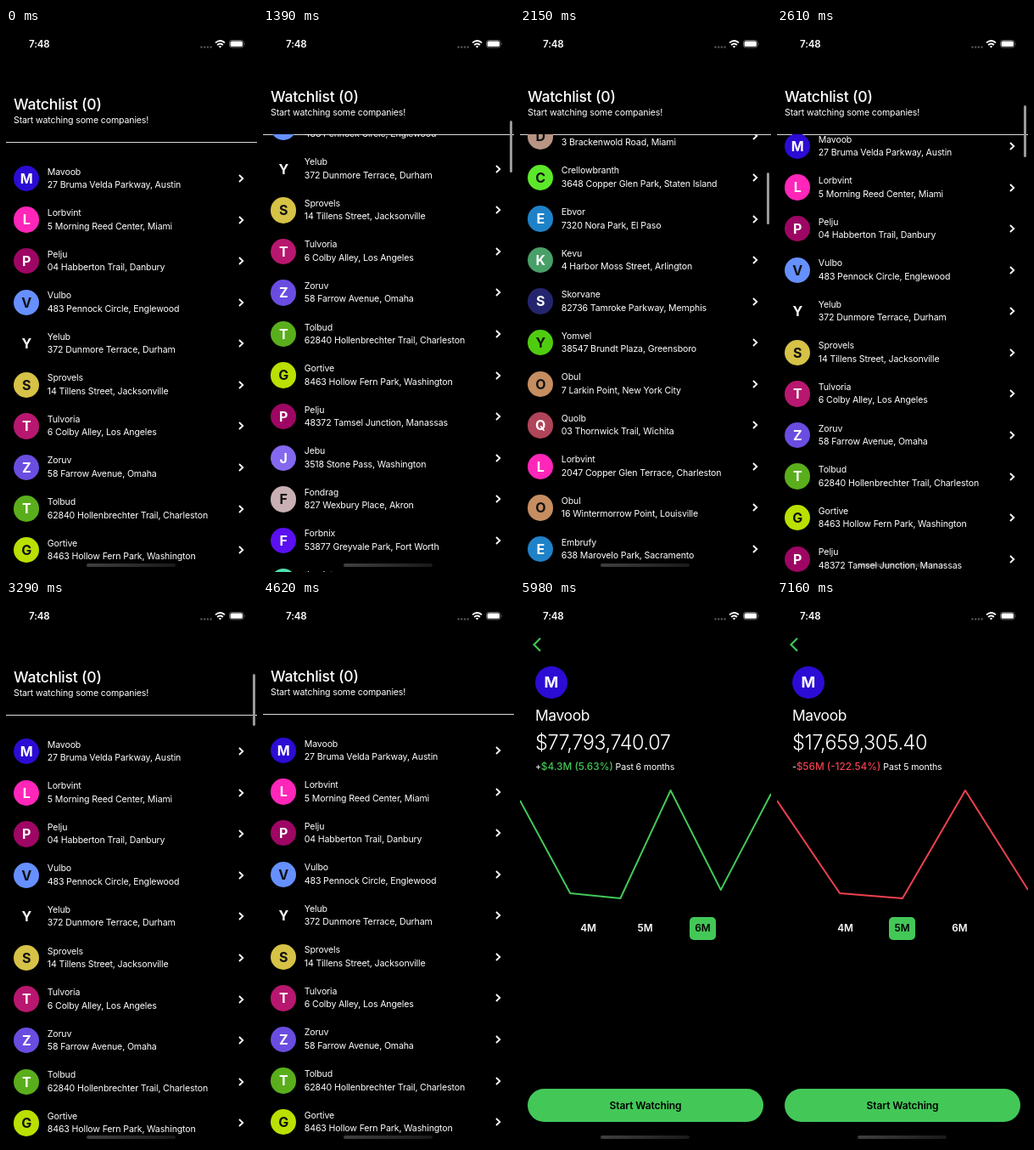
These frames come from a looping animation (296x640 px, 8000 ms). An HTML page:

```html
<!DOCTYPE html>
<html lang="en">
<head>
<meta charset="utf-8">
<title>Company watchlist</title>
<style>
  html, body { margin: 0; width: 100%; height: 100%; overflow: hidden; background: #000; }
  #stage {
    position: relative; width: 296px; height: 640px; overflow: hidden; background: #000; color: #fff;
    font: 400 10.6px/20px Inter, "Liberation Sans", sans-serif; letter-spacing: -.15px; white-space: nowrap;
  }
  #stage div, #stage svg { position: absolute; }
  .screen { left: 0; top: 0; width: 296px; height: 640px; background: #000; overflow: hidden; }
  .big { font-size: 17.4px; letter-spacing: -.35px; }
  #head { left: 0; top: 0; width: 296px; height: 134px; border-bottom: 1px solid #dcdcdc; }
  #title { left: 9px; top: 79.5px; font-size: 17.6px; font-weight: 500; letter-spacing: -.22px; }
  #list { left: 0; width: 296px; bottom: 0; overflow: hidden; }
  #rows { left: 0; top: 0; width: 296px; }
  .row { left: 0; width: 296px; height: 30.4px; }
  .badge { left: 9.1px; top: 0; width: 30.4px; border-radius: 50%; text-align: center; font: 700 16px/30.4px Inter, sans-serif; letter-spacing: 0; }
  .row .name { left: 48.8px; top: -2.3px; }
  .row .addr { left: 48.8px; top: 13.2px; }
  .row svg { left: 271.7px; top: 9.2px; }
  #thumb { left: 291px; width: 3px; height: 61px; border-radius: 2px; background: #999; }
  #price { left: 18px; top: 153px; font-size: 23.5px; font-weight: 300; line-height: 30px; letter-spacing: -.45px; }
  #delta { left: 18px; top: 186px; }
  #delta b { font-size: 11.8px; font-weight: 500; letter-spacing: 0; }
  .chip { top: 373px; width: 31px; height: 27px; border-radius: 5px; text-align: center; font: 600 11.8px/27px Inter, sans-serif; letter-spacing: 0; }
  .chip.on { background: #43c858; color: #000; }
  #watch { left: 9px; top: 575px; width: 278px; border-radius: 20px; background: #43c858; color: #000; text-align: center; font: 600 12px/39px Inter, sans-serif; letter-spacing: -.08px; }
  #home { left: 95px; top: 630px; width: 105px; height: 4px; border-radius: 2px; background: linear-gradient(90deg, rgba(255,255,255,.25), rgba(255,255,255,.1)); }
  #clock { left: 27px; top: 9px; font-size: 11.6px; font-weight: 600; letter-spacing: -.15px; }
</style>
</head>
<body>
<div id="stage">
  <div class="screen" id="main">
    <div id="head">
      <div id="title">Watchlist (0)</div>
      <div style="left:9px;top:99px">Start watching some companies!</div>
    </div>
    <div id="list"><div id="rows"></div></div>
    <div id="thumb"></div>
  </div>

  <div class="screen" id="detail">
    <div class="badge" style="left:18px;top:78px;width:38px;font-size:18px;line-height:38px;background:#2b0cd4">M</div>
    <div class="big" style="left:18px;top:126px">Mavoob</div>
    <div id="price"></div>
    <div id="delta"><span id="sign"></span><b id="change"></b> <span id="span"></span></div>
    <svg id="chart" width="296" height="400" style="left:0;top:0" fill="none" stroke-width="2" stroke-linejoin="round">
      <polyline id="line"/>
    </svg>
    <div class="chip" style="left:65px">4M</div>
    <div class="chip" id="five" style="left:132px">5M</div>
    <div class="chip" id="six" style="left:200px">6M</div>
    <div id="watch">Start Watching</div>
  </div>

  <svg id="back" width="40" height="70" style="left:0;top:0" fill="none" stroke="#3fc656" stroke-width="2.2">
    <path d="M24 45L16.5 52.5L24 60"/>
  </svg>
  <div id="clock">7:48</div>
  <svg width="296" height="40" style="left:0;top:0">
    <g fill="#555">
      <circle cx="230.5" cy="22.5" r="1.2"/><circle cx="234.2" cy="22.5" r="1.2"/>
      <circle cx="237.9" cy="22.5" r="1.2"/><circle cx="241.6" cy="22.5" r="1.2"/>
    </g>
    <g fill="none" stroke="#fff" stroke-width="1.8">
      <path d="M247 17.4Q252.5 12.6 258 17.4"/><path d="M249.1 20Q252.5 17 255.9 20"/>
    </g>
    <path d="M250.7 21.6Q252.5 20.2 254.3 21.6L252.5 23.4Z" fill="#fff"/>
    <rect x="263.5" y="14.5" width="16.5" height="8.4" rx="2.6" fill="none" stroke="#666"/>
    <rect x="264.6" y="15.6" width="14.3" height="6.2" rx="1.6" fill="#fff"/>
    <path d="M281 17.2q1.4 1.5 0 3z" fill="#666"/>
  </svg>
  <div id="home"></div>
</div>

<script>
const $ = id => document.getElementById(id);
const LOOP = 8000, PITCH = 48.57, FIRST = 177;

// name, address, badge colour; a leading "*" means dark lettering
const companies = `Mavoob|27 Bruma Velda Parkway, Austin|#2b0cd4
Lorbvint|5 Morning Reed Center, Miami|#ff26b9
Pelju|04 Habberton Trail, Danbury|#9e0664
*Vulbo|483 Pennock Circle, Englewood|#6690ff
Yelub|372 Dunmore Terrace, Durham|#000
*Sprovels|14 Tillens Street, Jacksonville|#d6c246
Tulvoria|6 Colby Alley, Los Angeles|#b8176f
Zoruv|58 Farrow Avenue, Omaha|#6a4de0
Tolbud|62840 Hollenbrechter Trail, Charleston|#5aae1c
*Gortive|8463 Hollow Fern Park, Washington|#b9e000
Pelju|48372 Tamsel Junction, Manassas|#9e0664
Jebu|3518 Stone Pass, Washington|#8468f0
*Fondrag|827 Wexbury Place, Akron|#c9b0b4
Forbnix|53877 Greyvale Park, Fort Worth|#5a10f0
*Jorvint|215 Linden Hollow Court, Tampa|#4de0b0
*Dabtrel|3 Brackenwold Road, Miami|#b89484
*Crellowbranth|3648 Copper Glen Park, Staten Island|#5ce82a
Ebvor|7320 Nora Park, El Paso|#1f82c8
Kevu|4 Harbor Moss Street, Arlington|#48a068
Skorvane|82736 Tamroke Parkway, Memphis|#25256f
*Yomvel|38547 Brundt Plaza, Greensboro|#50cc10
*Obul|7 Larkin Point, New York City|#c58d60
Quolb|03 Thornwick Trail, Wichita|#b04458
Lorbvint|2047 Copper Glen Terrace, Charleston|#ff26b9
*Obul|16 Wintermorrow Point, Louisville|#c58d60
Embrufy|638 Marovelo Park, Sacramento|#1f82c8
Tulvoria|92 Alder Brook Lane, Dayton|#b8176f`.split("\n");

$("rows").innerHTML = companies.map((entry, i) => {
  const dark = entry[0] === "*";
  const [name, addr, color] = entry.replace("*", "").split("|");
  return `<div class="row" style="top:${i * PITCH}px">
    <div class="badge" style="background:${color};color:${dark ? "#111" : "#fff"}">${name[0]}</div>
    <div class="name">${name}</div><div class="addr">${addr}</div>
    <svg width="10" height="12" fill="none" stroke="#fff" stroke-width="1.8"><path d="M3 2L7.3 6L3 10"/></svg></div>`;
}).join("");

// moments at which the screen refreshes
const ticks = [0, 1250, 1390, 1500, 1610, 1720, 1820, 1930, 2040, 2150, 2260, 2370, 2500, 2610, 2720,
  2830, 2940, 3050, 3170, 3290, 4370, 4510, 4620, 5380, 5510, 5640, 5750, 5860, 5980, 7160];
const snap = t => ticks.filter(k => k <= t).pop();
const clamp = (v, a, b) => Math.min(b, Math.max(a, v));

function scrollAt(t) {
  if (t < 1160 || t >= 4370) return 0;
  if (t < 1390) return 205.5 * ((t - 1160) / 230) ** 1.6;
  if (t < 2200) return 205.5 + 733 * (1 - Math.exp((1390 - t) / 500));
  if (t < 2610) {
    const p = clamp((t - 2190) / 420, 0, 1);
    return 778 - 740 * p * p * (3 - 2 * p);
  }
  const u = t - 2610;                     // rubber band at the top
  return (38 - .9 * u) * Math.exp(-u / 110);
}

function thumbAlpha(t) {
  if (t < 1250 || t >= 4620) return 0;
  return t < 4370 ? 1 : clamp((4620 - t) / 400, 0, 1);
}

const levels = [236, 345, 351, 224, 341, 228];

function drawChart(count, color, scale, reveal) {
  const step = 296 / (count - 1), floor = 372;
  $("line").setAttribute("points", levels.slice(0, count)
    .map((y, i) => `${i * step},${floor + (y - floor) * scale}`).join(" "));
  $("line").setAttribute("stroke", color);
  $("chart").style.clipPath = `inset(0 ${296 * (1 - reveal)}px 0 0)`;
}

function showPeriod(months, price, sign, change, color) {
  $("price").textContent = price;
  $("sign").textContent = sign;
  $("change").textContent = change;
  $("change").style.color = color;
  $("span").textContent = `Past ${months} months`;
  $("five").classList.toggle("on", months === 5);
  $("six").classList.toggle("on", months === 6);
}

function render(time) {
  const t = snap(time);
  const scroll = scrollAt(t);
  const shift = Math.round(Math.max(-9, -scroll));
  const top = 134 + shift;
  $("head").style.top = shift + "px";
  $("list").style.top = top + "px";
  $("rows").style.top = FIRST - 15.2 - scroll - top + "px";
  $("thumb").style.top = 87 + Math.max(0, scroll) * .107 + "px";
  $("thumb").style.opacity = thumbAlpha(t);

  const u = Math.max(0, (t - 5320) / 78);
  const rest = t >= 5980 ? 0 : (1 + u) * Math.exp(-u);
  $("detail").style.left = Math.round(296 * rest) + "px";
  $("main").style.left = Math.round(-88.8 * (1 - rest)) + "px";
  $("back").style.opacity = (1 - rest) ** 1.2;

  if (t >= 7160) {
    showPeriod(5, "$17,659,305.40", "-", "$56M (-122.54%)", "#f0414f");
    drawChart(5, "#f0414f", 1, 1);
  } else {
    const q = clamp((t - 5380) / 600, 0, 1);
    showPeriod(6, "$77,793,740.07", "+", "$4.3M (5.63%)", "#43c858");
    drawChart(6, "#43c858", 1 - (1 - q) ** 1.4, q ** 1.08);
  }
}

function frame() {
  render(performance.now() % LOOP);
  requestAnimationFrame(frame);
}
frame();
</script>
</body>
</html>
```
